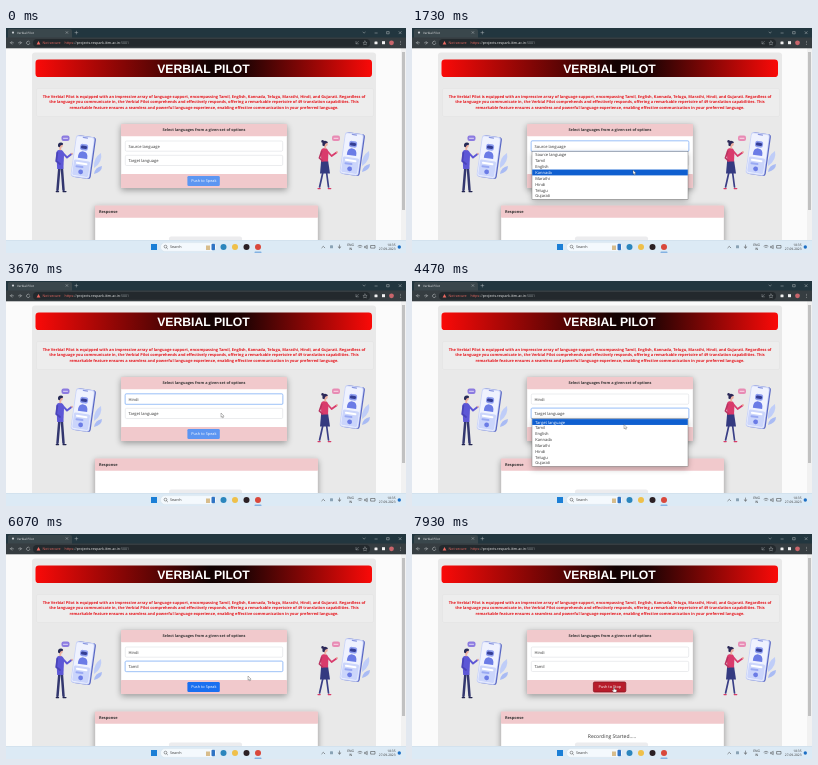
These frames come from a looping animation (400x225 px, 8 s). An HTML page:

```html
<!DOCTYPE html>
<html lang="en">
<head>
<meta charset="utf-8">
<title>Verbial Pilot</title>
<style>
html, body { margin: 0; width: 100%; height: 100%; overflow: hidden; background: #fff; }
svg { display: block; width: 100vw; height: 100vh; }
text { font-family: "Open Sans", "Noto Sans", sans-serif; font-size: 4.05px; fill: #333; text-rendering: geometricPrecision; }
.b { font-weight: 700; }
.m { text-anchor: middle; }
.w { fill: #fff; }
</style>
</head>
<body>
<svg id="stage" viewBox="0 0 400 225" preserveAspectRatio="none"></svg>
<script>
const LOOP = 8000;
const LANGS = ["Tamil", "English", "Kannada", "Marathi", "Hindi", "Telugu", "Gujarati"];
const ROW = 5.85;

const rect = (x, y, w, h, fill, more = "") =>
  `<rect x="${x}" y="${y}" width="${w}" height="${h}" fill="${fill}" ${more}/>`;
const circle = (x, y, r, fill, more = "") =>
  `<circle cx="${x}" cy="${y}" r="${r}" fill="${fill}" ${more}/>`;
const path = (d, fill, more = "") => `<path d="${d}" fill="${fill}" ${more}/>`;
const line = (d, color, width = 0.6) =>
  path(d, "none", `stroke="${color}" stroke-width="${width}" stroke-linecap="round" stroke-linejoin="round"`);
const text = (x, y, s, cls = "", more = "") =>
  `<text x="${x}" y="${y}" class="${cls}" ${more}>${s}</text>`;
const size = (px, fill) => `style="font-size:${px}px${fill ? ";fill:" + fill : ""}"`;

const defs = `<defs>
  <linearGradient id="banner">
    <stop offset="0" stop-color="#fa0a08"/><stop offset=".52" stop-color="#120202"/>
    <stop offset=".62" stop-color="#200303"/><stop offset="1" stop-color="#fa0a08"/>
  </linearGradient>
  <filter id="soft" x="-20%" y="-30%" width="140%" height="160%"><feGaussianBlur stdDeviation="3"/></filter>
  <clipPath id="page"><rect y="20" width="400" height="192"/></clipPath>
</defs>`;

function browser() {
  return rect(0, 0, 400, 10, "#22363f") +
    path("M2 10V2.5Q2 1 3.5 1H64Q66 1 66 3V10Z", "#3a474c") +
    circle(7, 4.6, 1.1, "#c9ced3") +
    text(11, 5.7, "Verbial Pilot", "", size(3.05, "#e4e6e8")) +
    line("M60 3.6l1.8 1.8m0-1.8l-1.8 1.8M69 4.6h2.8m-1.4-1.4v2.8", "#c8cccf", 0.4) +
    line("M357 4.2l1.1 .9 1.1-.9M369 5h2.2M381 3.6h2.2v2.2H381zM393 3.6l2.2 2.2m0-2.2l-2.2 2.2", "#d5d8da", 0.4) +
    rect(0, 9.5, 400, 10.8, "#363d41") +
    rect(27, 11, 337, 7.8, "#23292d", 'rx="3.9"') +
    line("M7.4 14.8H4.5l1.4-1.4M4.5 14.8l1.4 1.4M12.5 14.8h2.9l-1.4-1.4M15.4 14.8l-1.4 1.4M23.6 13.9a1.7 1.7 0 1 0 .2 1.6", "#c8cccf", 0.5) +
    path("M32.5 13l1.9 3.4h-3.8Z", "#ee6a62") +
    text(36.5, 16.2, "Not secure", "", size(3.6, "#ee6a62")) +
    `<text x="58.5" y="16.2" ${size(3.6, "#f2f2f2")}><tspan fill="#ee6a62">https</tspan><tspan fill="#aaa">://</tspan>projects.respark.iitm.ac.in<tspan fill="#9aa0a5">:5001</tspan></text>` +
    line("M350 15.8l2.4-2.4m-2.4 0v2.4h2.4M359 13l.6 1.4 1.5.1-1.1 1 .3 1.5-1.3-.8-1.3.8.3-1.5-1.1-1 1.5-.1Z", "#aeb3b6", 0.4) +
    rect(368.5, 13.4, 3, 2.8, "#f2f2f2", 'rx=".5"') + rect(376, 13.2, 3, 3, "#f2f2f2") +
    circle(385.5, 14.8, 2.4, "#c9656b") +
    [13.2, 14.8, 16.4].map(y => circle(394.5, y, 0.4, "#ddd")).join("");
}

// Pale handset with an assistant on its screen, drawn around its centre
function phone(x, y, tilt) {
  return `<g transform="translate(${x} ${y}) rotate(${tilt})">` +
    rect(-8.6, -21, 19, 42, "#5a68c4", 'rx="2.6"') +
    rect(-9.8, -21, 19, 42, "#c9d3f8", 'rx="2.6"') +
    rect(-9, -20, 17.4, 40, "#eff2fe", 'rx="2"') +
    rect(-3, -20, 5.4, 1.2, "#8b98e0", 'rx=".6"') +
    rect(-4.3, -13, 8, 6.4, "#8d9df0", 'rx="2.6"') +
    rect(-3.4, -11.4, 6.2, 3.2, "#343e94", 'rx="1.5"') +
    path("M-5 1.5Q-5.4-5.6-.3-5.6T4.4 1.5Z", "#6b7ce6") +
    rect(-8.4, 3.6, 16.2, 15.6, "#cbd5fb", 'rx="1.6"') +
    rect(-6.2, 5.6, 11.6, 2, "#fff", 'rx="1"') + rect(-6.2, 9, 8, 2, "#99a9f3", 'rx="1"') +
    circle(-0.3, 15, 2.4, "#6b7ce6") + "</g>";
}

const leaf = (x, y) =>
  path(`M${x} ${y}q-1-10 7-15q2 9-7 15`, "#bfcdf8") + path(`M${x} ${y + 6}q1-7 8-8q0 6-8 8`, "#a9bbf4");

const bubble = (x, y, color) =>
  rect(x, y, 8, 5.6, color, 'rx="2"') + line(`M${x + 2} ${y + 2.8}h4`, "#fff", 0.7);

function leftArt() {
  return leaf(88, 140) + phone(77, 129, 8) + bubble(55.5, 107.5, "#8c7be0") +
    line("M53.4 139L51.5 162M55.8 139L57.5 162", "#33376f", 2.5) +
    line("M50.2 163.6h2.4M57 163.6h3", "#22254f", 1.2) +
    path("M50.3 125Q50.8 121.8 54.2 121.8Q58 122.2 58 127L57.4 141H51.2Z", "#5d57d6") +
    line("M57 125.2L61 129.5L65.5 126", "#5d57d6", 1.9) + circle(66, 125.7, 0.9, "#eeb1a0") +
    line("M51.3 125L50.2 133L54 136", "#4a44b8", 1.8) +
    rect(53.4, 119, 1.8, 3.2, "#eeb1a0") + circle(54.6, 117.5, 2.2, "#eeb1a0") +
    path("M52 118.5Q51.5 114.6 55 114.6Q57.6 114.8 57 116.7Q54.2 116.3 53.7 119.3Z", "#262a57");
}

function rightArt() {
  return leaf(356, 138) + phone(346, 126, 8) + bubble(326, 107.5, "#e88bb4") +
    line("M317.2 143L313.6 159M320.4 143L322.5 159", "#3a3f86", 1.7) +
    line("M312 160.6h2.2M322.2 160.6h2.6", "#d83b67", 1.2) +
    path("M315.2 132H322L324 145.5H314Z", "#343a80") +
    path("M314.8 123Q315.3 120 319 120Q322.4 120.5 322.4 125L322 133.5H315.3Z", "#d93b6c") +
    line("M321.6 123.5L325.6 128L330.5 124.5", "#d93b6c", 1.8) + circle(331, 124, 0.9, "#eeb1a0") +
    line("M315.6 123.5L313.4 130L316.6 133", "#b93361", 1.7) +
    rect(318.3, 117.2, 1.8, 3.4, "#eeb1a0") + circle(319.6, 116, 2.2, "#eeb1a0") +
    circle(316.6, 113.4, 1.3, "#2b2858") +
    path("M316.6 117.8Q315.6 112.8 319.2 112.7Q322 113 321.9 115Q318.9 114.6 318.4 118.3Z", "#2b2858");
}

function card(x, y, w, h) {
  return rect(x, y + 2, w, h, "#000", 'opacity=".36" filter="url(#soft)"') +
    rect(x, y, w, h, "#fff", 'rx="1" stroke="#c4bfc1" stroke-width=".35"') +
    rect(x, y, w, 12.2, "#f1c9cc", 'rx=".8"');
}

function page() {
  const red = size(3.93, "#e6151c");
  return rect(0, 20, 400, 192, "#fbfbfb") + rect(26, 24.5, 344, 195, "#e9e9e9", 'rx="3"') +
    rect(395, 20, 5, 192, "#f1f1f1") + rect(396, 24, 3, 158, "#c1c1c1") +
    rect(29.5, 31.5, 336.5, 17.6, "url(#banner)", 'rx="3.4"') +
    text(197.5, 44.8, "VERBIAL PILOT", "m w",
      'style="font:bold 12.2px \'Liberation Sans\',Arial,sans-serif"') +
    rect(30.5, 60.5, 337, 28, "#ededed", 'rx="1.5" stroke="#dedede" stroke-width=".4"') +
    text(198, 69.5, "The Verbial Pilot is equipped with an impressive array of language support, encompassing Tamil, English, Kannada, Telugu, Marathi, Hindi, and Gujarati. Regardless of", "b m", red) +
    text(198, 75.4, "the language you communicate in, the Verbial Pilot comprehends and effectively responds, offering a remarkable repertoire of 49 translation capabilities. This", "b m", red) +
    text(198, 81.3, "remarkable feature ensures a seamless and powerful language experience, enabling effective communication in your preferred language.", "b m", red) +
    leftArt() + rightArt() +
    card(115, 96, 166, 64) + rect(115, 146, 166, 14, "#f1c9cc", 'rx=".8"') +
    text(198, 103.4, "Select languages from a given set of options", "b m", size(3.8)) +
    card(89, 177.5, 223, 50) + text(93, 185, "Response", "b", size(3.9));
}

function taskbar() {
  const dots = [[217.5, "#2b86bd"], [229, "#efc04a"], [240.5, "#2b2024"], [252, "#d9483b"]];
  return rect(0, 212, 400, 13, "#dceaf5") + rect(0, 212, 400, 0.4, "#c6d5e2") +
    rect(145, 216, 6, 6, "#1b7fd6") +
    rect(154.5, 214.6, 56, 8.8, "#f4f9fd", 'rx="4.4" stroke="#c9d6e1" stroke-width=".3"') +
    circle(159.5, 218.6, 1.4, "none", 'stroke="#444" stroke-width=".5"') + line("M160.6 219.8l1 1", "#444", 0.5) +
    text(164, 220.4, "Search", "", size(3.7)) +
    rect(200, 217.5, 4, 4.5, "#d8bd8c") + rect(205.5, 215.8, 3.5, 6.5, "#2f74c4", 'rx="1"') +
    dots.map(([x, c]) => circle(x, 219, 3, c)).join("") +
    rect(248.5, 223.8, 7, 0.7, "#2c7bd0", 'rx=".35"') +
    line("M315.8 219.8l1.5-1.5 1.5 1.5", "#333", 0.5) +
    rect(324, 217.3, 3, 3, "#8aa3b5", 'rx=".6"') + line("M333.5 217v3m-1.2-1.2a1.2 1.2 0 0 0 2.4 0", "#444", 0.5) +
    text(344.5, 218.1, "ENG", "m", size(3.3)) + text(344.5, 222.3, "IN", "m", size(3.3)) +
    line("M352 218q2-1.8 4 0M353 219.3q1-.9 2 0M359 218.3h1l1.2-1v3.4l-1.2-1h-1zM365 217.5h4v2.6h-4z", "#333", 0.5) +
    text(389.5, 218.1, "18:35", "", size(3.2) + ' text-anchor="end"') +
    text(389.5, 222.3, "27-09-2023", "", size(3.2) + ' text-anchor="end"') +
    circle(393.3, 219, 1.7, "#1c6fc4");
}

function select(y, value, focused) {
  return (focused ? rect(118.6, y - 0.8, 158.8, 11.8, "#bcd5fb", 'rx="1.8"') : "") +
    rect(119.3, y, 157.4, 10.2, "#fff", `rx="1.2" stroke="${focused ? "#7facf3" : "#d6d9dd"}" stroke-width=".5"`) +
    text(122.6, y + 6.6, value);
}

// The shadow shows a moment before the list itself
function menu(top, title, active, t, open, close) {
  if (t < open || t >= close) return "";
  const shadow = rect(120, top + 2, 156, 48, "#000", 'opacity=".26" filter="url(#soft)"');
  const rows = [title, ...LANGS].map((s, i) => {
    const y = top + 0.4 + i * ROW, on = i === active;
    return (on ? rect(120.2, y, 155.6, ROW, "#0f5fd0") : "") + text(123.2, y + 4.4, s, on ? "w" : "");
  }).join("");
  const list = rect(120, top, 156, 47.6, "#fff", 'stroke="#666" stroke-width=".4"') + rows;
  const opacity = Math.min(1, Math.max(0, (t - open - 40) / 50));
  return shadow + `<g opacity="${opacity}">${list}</g>`;
}

function button(t, over) {
  const stop = t >= 7330, ready = t >= 4960;
  const fill = stop ? "#b81c2b" : !ready ? "#5c96f2" : over ? "#0b5ed7" : "#1a6ff0";
  return rect(181.4, 148, 32.4, 10, fill, `rx="1.3" ${stop ? 'stroke="#8a1622" stroke-width=".8"' : ""}`) +
    text(197.8, 154.4, stop ? "Push to Stop" : "Push to Speak", "m w", size(3.85));
}

// Pointer stops: time, x, y
const TRACK = [
  [70, 237, 148], [600, 222, 120.5], [930, 222, 120.5], [1650, 221, 142], [1800, 221, 142],
  [2600, 216, 154.5], [3000, 216, 154.5], [3330, 215, 132], [4180, 215, 132], [4450, 212, 143.5],
  [5730, 212, 143.5], [6070, 242, 142], [6400, 242, 142], [7100, 202, 153], [LOOP, 202, 153]
];
function pointer(t) {
  const i = Math.max(1, TRACK.findIndex(k => k[0] > t));
  const [t0, x0, y0] = TRACK[i - 1], [t1, x1, y1] = TRACK[i];
  const p = Math.min(1, Math.max(0, (t - t0) / (t1 - t0))), e = p * p * (3 - 2 * p);
  return [x0 + (x1 - x0) * e, y0 + (y1 - y0) * e];
}

function cursor(x, y, hand) {
  const d = hand
    ? "M-.5.4Q0-.4.5.4V2.2L2.4 2.7Q2.9 3 2.7 3.8L2.2 5.3H-.4L-1.8 3.4Q-1.6 2.5-.5 3.2Z"
    : "M0 0V4.3L1 3.4 1.7 4.9 2.4 4.6 1.8 3.2H3.1Z";
  return `<g transform="translate(${x} ${y})">` + path(d, "#fff", 'stroke="#444" stroke-width=".35"') + "</g>";
}

const rowAt = (y, top) => Math.max(0, Math.min(LANGS.length, Math.floor((y - top - 0.4) / ROW)));

function dynamic(t) {
  const [x, y] = pointer(t);
  const over = t > 6400 && x > 181 && x < 214 && y > 148 && y < 158;
  const first = t < 3000 ? rowAt(y + 1, 123.6) : 5;
  const second = t < 4500 ? 0 : 1;
  return select(113, t < 3000 ? "Source language" : "Hindi", t >= 860 && t < 3700) +
    select(127.3, t < 4960 ? "Target language" : "Tamil", t >= 3700 && t < 7270) +
    button(t, over) +
    rect(163, 208.5, 73, 8, "#ececee", 'rx="2"') +
    (t >= 7400 ? text(200, 203.8, "Recording Started.....", "m", size(5)) : "") +
    menu(123.6, "Source language", first, t, 780, 3050) +
    menu(137.7, "Target language", second, t, 3760, 5020) +
    (t >= 70 ? cursor(x, y, over) : "");
}

const stage = document.getElementById("stage");
stage.innerHTML = defs + `<g clip-path="url(#page)">${page()}<g id="live"></g></g>` + browser() + taskbar();
const live = document.getElementById("live");
const start = performance.now();

function frame(now) {
  live.innerHTML = dynamic(Math.max(0, now - start) % LOOP);
  requestAnimationFrame(frame);
}
frame(start);
</script>
</body>
</html>
```
